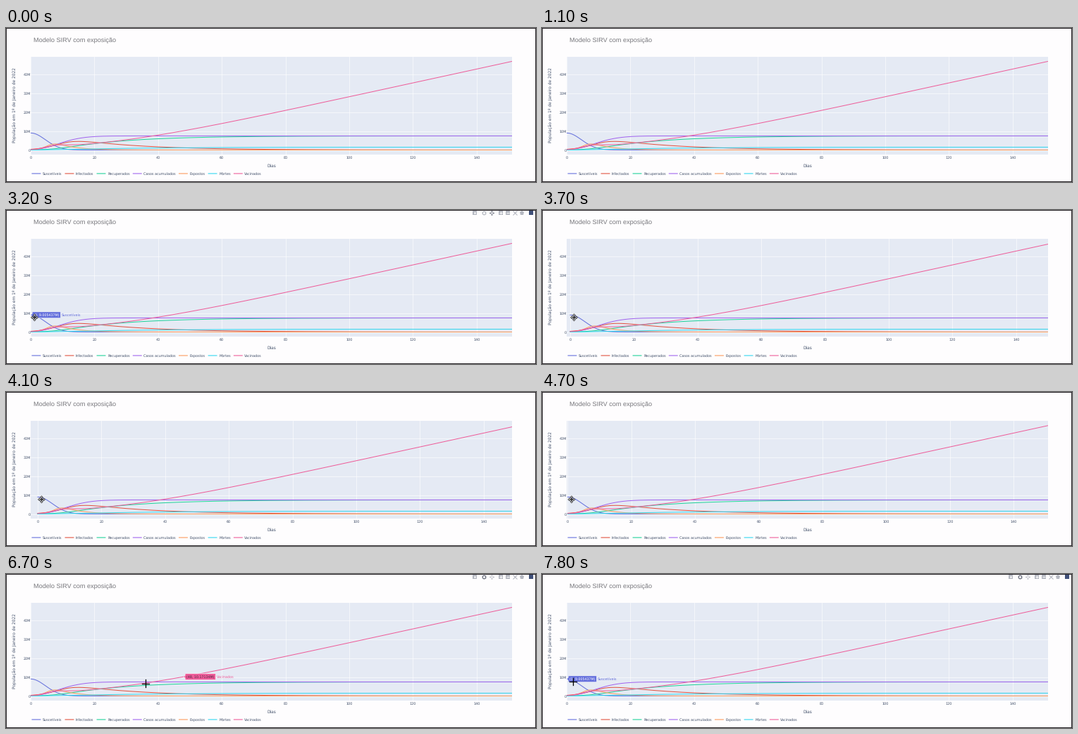
A matplotlib script for the animation above (8 s loop, 752 px wide and 219 px high).

```python
import numpy as np
import matplotlib as mpl
import matplotlib.pyplot as plt
from matplotlib.animation import FuncAnimation
from matplotlib.patches import FancyBboxPatch, Polygon, Rectangle

W, H, DPI = 752, 219, 100
FRAMES, STEP = 80, 100
LEFT, RIGHT, TOP, BOTTOM = 35, 718, 41, 180
DAY, MILLION, ZERO = 4.52, 2.69, 173.5
INK, BLUE, PINK = "#42506a", "#636edc", "#ee5c99"
DIM, LIT, TIP = "#b6b9c2", "#666b7a", "#4d566f"

mpl.rcParams.update({"text.hinting": "none", "font.family": "DejaVu Sans"})


def pt(px):
    return px * 72 / DPI


def sigmoid(t, mid, width):
    return 1 / (1 + np.exp(-(t - mid) / width))


def softplus(t, mid, width):
    return width * np.log1p(np.exp((t - mid) / width))


def susceptible(t):
    return 9.005437 * np.exp(-(t / 6.5) ** 2)


def infected(t):
    return 10.4 * sigmoid(t, 9.5, 2.9) * np.exp(-0.0457 * t)


def recovered(t):
    return 7.45 * (1 - np.exp(-0.05 * softplus(t, 8, 3)))


def cumulative(t):
    return 0.15 + 7.3 * (1 - np.exp(-(t / 11.5) ** 2))


def exposed(t):
    return 15 * sigmoid(t, 6, 1.3) * np.exp(-0.17 * t)


def deaths(t):
    return 1.5 * (1 - np.exp(-t / 24)) ** 1.6


def vaccinated(t):
    rise = 1 - 0.85 * np.exp(-(t / 5) ** 2)
    return 0.367 * softplus(t, 23.4, 16) * rise + 0.8 * np.exp(-((t - 8) / 5) ** 2)


TRACES = {
    "Suscetíveis": (susceptible, BLUE),
    "Infectados": (infected, "#e2513f"),
    "Recuperados": (recovered, "#1fd39a"),
    "Casos acumulados": (cumulative, "#a163ee"),
    "Expostos": (exposed, "#fb9a5b"),
    "Mortes": (deaths, "#2fd6f0"),
    "Vacinados": (vaccinated, PINK),
}

# Pointer stops: time and place, joined by straight glides
START, ICON = (40.5, 152.8), (687, 8)
STOPS = [(1500, (640, 130)), (3200, START), (4900, START), (5400, (236, 146)),
         (5600, ICON), (5800, ICON), (6700, (198, 155.5)), (7800, (44, 153))]
# start, end, trace, day
HOVERS = [(3000, 3300, "Suscetíveis", 0), (5300, 5500, "Vacinados", 43),
          (6600, 6800, "Vacinados", 48), (7700, 8000, "Suscetíveis", 0)]
DRAG = (3300, 4900)

fig = plt.figure(figsize=(W / DPI, H / DPI), dpi=DPI, facecolor="#fefdfe")
ax = fig.add_axes([0, 0, 1, 1])
ax.set(xlim=(0, W), ylim=(H, 0))
ax.axis("off")


def text(x, y, s, size=4.9, color=INK, ha="left", va="center_baseline", **kw):
    return ax.text(x, y, s, fontsize=pt(size), color=color, ha=ha, va=va, **kw)


def shape(patch, z=5):
    patch.set_zorder(z)
    return ax.add_patch(patch)


def line(xs, ys, color, width, z=5, **kw):
    return ax.plot(xs, ys, color=color, lw=pt(width), zorder=z, **kw)[0]


def rect(x, y, w, h, color, z):
    return shape(Rectangle((x, y), w, h, fc=color, lw=0), z)


def four_way(size):
    half = np.array([(.13, -.13), (.13, -.55), (.4, -.55), (0, -1)])
    arm = np.vstack([half, half[2:0:-1] * (-1, 1)])
    turns = [np.array([(c, s), (-s, c)]) for c, s in [(1, 0), (0, 1), (-1, 0), (0, -1)]]
    return np.vstack([arm @ m for m in turns]) * size


def curve_y(model, t):
    return ZERO - model(t) * MILLION


# Window edge and static chart parts
rect(0, 0, 1.4, H, "#2b272b", 20)
rect(W - 1, 0, 1, H, "#2b272b", 20)
rect(0, 0, W, 0.6, "#2b272b", 20)
rect(0, H - 1, W, 1, "#2b272b", 20)
plot_area = rect(LEFT, TOP, RIGHT - LEFT, BOTTOM - TOP, "#e5eaf4", 0)
text(38.8, 20.3, "Modelo SIRV com exposição", 9.1, "#77777c", va="baseline", family="Liberation Sans")
text(376.5, 196, "Dias", 5.9, ha="center")
text(12.3, 109.8, "População em 1º de Janeiro de 2022", 5.9, ha="center", va="center", rotation=90)

for m in range(0, 50, 10):
    y = ZERO - m * MILLION
    line([LEFT, RIGHT], [y, y], "white", 0.9, 1, alpha=0.65)
    text(35, y + 0.4, f"{m}M" if m else "0", ha="right")

grid = []
for d in range(0, 160, 20):
    rule = line([0, 0], [TOP, BOTTOM], "white", 0.9, 1, alpha=0.65)
    rule.set_clip_path(plot_area)
    grid.append((d, rule, text(0, 184.3, str(d), ha="center")))

days = np.linspace(0, 151, 500)
curves = []
legend_x = 37
for name, (model, color) in TRACES.items():
    curve = line(LEFT + days * DAY, curve_y(model, days), color, 1, 3)
    curve.set_clip_path(plot_area)
    curves.append(curve)
    line([legend_x, legend_x + 11.8], [207, 207], color, 1.1, snap=False)
    label = text(legend_x + 14.9, 207, name)
    legend_x = label.get_window_extent().x1 + 4.7


# Mode bar
def icon(x, marker, size, color=DIM, **kw):
    return ax.plot(x, 4, marker=marker, ms=pt(size), color=color, mew=kw.pop("mew", 0),
                   zorder=5, **kw)[0]


zoom_icon = [icon(677.5, "o", 4.6, mfc="none", mew=0.9), icon(680.3, "$\\backslash$", 4)]
pan_icon = icon(688.5, four_way(1) * (1, -1), 7.2)
bar = zoom_icon + [pan_icon, icon(665.1, "s", 5.6), icon(665.1, "o", 2.6, "white")]
for x, sign in [(702, "+"), (712, "_")]:
    bar += [icon(x, "s", 6), icon(x, sign, 3.8, "white", mew=0.7)]
bar += [icon(722, "x", 5.6, mew=0.8), icon(732, "p", 6.6), icon(745, "s", 6.4, "#40507a")]

tooltip = [
    shape(FancyBboxPatch((664.5, 12), 20.5, 8, boxstyle="round,pad=1,rounding_size=1.2", fc=TIP, lw=0), 8),
    shape(Polygon([(676, 11.2), (678, 9), (680, 11.2)], fc=TIP, lw=0), 8),
    text(674.7, 16.1, "Zoom", 5, "white", ha="center", zorder=9),
]

# Hover label
tag = shape(Polygon([(0, 0)] * 7, ec="white", lw=pt(0.5)), 10)
tag_value = text(0, 0, "", 4.7, zorder=11)
tag_name = text(0, 0, "", 4.9, zorder=11)

# Cursors, outlined around their hot spot
MOVE = four_way(5)
HAND = np.array([(-1, -4), (1, -4), (1, -.8), (4, 0), (3, 5), (-1, 5), (-3, .6), (-1, 1.2)])
mover = shape(Polygon(MOVE, fc="white", ec="#333333", lw=pt(0.8)), 15)
hand = shape(Polygon(HAND, fc="white", ec="black", lw=pt(0.9), joinstyle="round"), 15)
cross = [line([0, 0], [0, 0], "black", 1.3, 15) for _ in range(2)]


def drag_shift(t):
    u = np.clip((t - DRAG[0]) / (DRAG[1] - DRAG[0]), 0, 1)
    return 10 * np.sin(np.pi * u) ** 2


def place_cursor(t, shift):
    times, places = zip(*STOPS)
    x, y = (np.interp(t, times, axis) for axis in zip(*places))
    x += shift
    mover.set_visible(1500 <= t < 5600)
    hand.set_visible(5600 <= t < 5900)
    mover.set_xy(MOVE + (x, y))
    hand.set_xy(HAND + (x, y))
    cross[0].set_data([x - 5.2, x + 5.2], [y, y])
    cross[1].set_data([x, x], [y - 5.2, y + 5.2])
    for part in cross:
        part.set_visible(t >= 5900)


def place_hover(t):
    active = [h[2:] for h in HOVERS if h[0] <= t < h[1]]
    for part in (tag, tag_value, tag_name):
        part.set_visible(bool(active))
    if not active:
        return
    name, day = active[0]
    model, color = TRACES[name]
    x, y = LEFT + day * DAY, curve_y(model, day)
    tag_value.set(text=f"({day}, {model(day):.7g}M)", position=(x + 4, y),
                  color="white" if color == BLUE else "#4a2440")
    near, end = x + 2.2, x + 6 + tag_value.get_window_extent().width
    tag.set_xy([(x + .4, y), (near, y - 2), (near, y - 4.4), (end, y - 4.4),
                (end, y + 4.4), (near, y + 4.4), (near, y + 2)])
    tag.set_facecolor(color)
    tag_name.set(text=name, position=(end + 1.6, y), color=color)


def draw(i):
    t = i * STEP
    shift = drag_shift(t)
    for curve in curves:
        curve.set_xdata(LEFT + shift + days * DAY)
    for d, rule, label in grid:
        x = LEFT + shift + d * DAY
        rule.set_xdata([x, x])
        label.set_x(x)

    shown = 1500 <= t < DRAG[0] or t >= DRAG[1]
    for part in bar:
        part.set_visible(shown)
        part.set_alpha(np.clip((t - 1400) / 300, 0, 1))
    for part in zoom_icon:
        part.set_color(LIT if t >= 5600 else DIM)
    zoom_icon[0].set_markerfacecolor("none")
    pan_icon.set_color(LIT if t < 5900 else DIM)
    for part in tooltip:
        part.set_visible(5600 <= t < 5900)

    place_hover(t)
    place_cursor(t, shift)
    return []


anim = FuncAnimation(fig, draw, frames=FRAMES, interval=STEP, repeat=True,
                     repeat_delay=0, blit=False)
plt.show()
```
